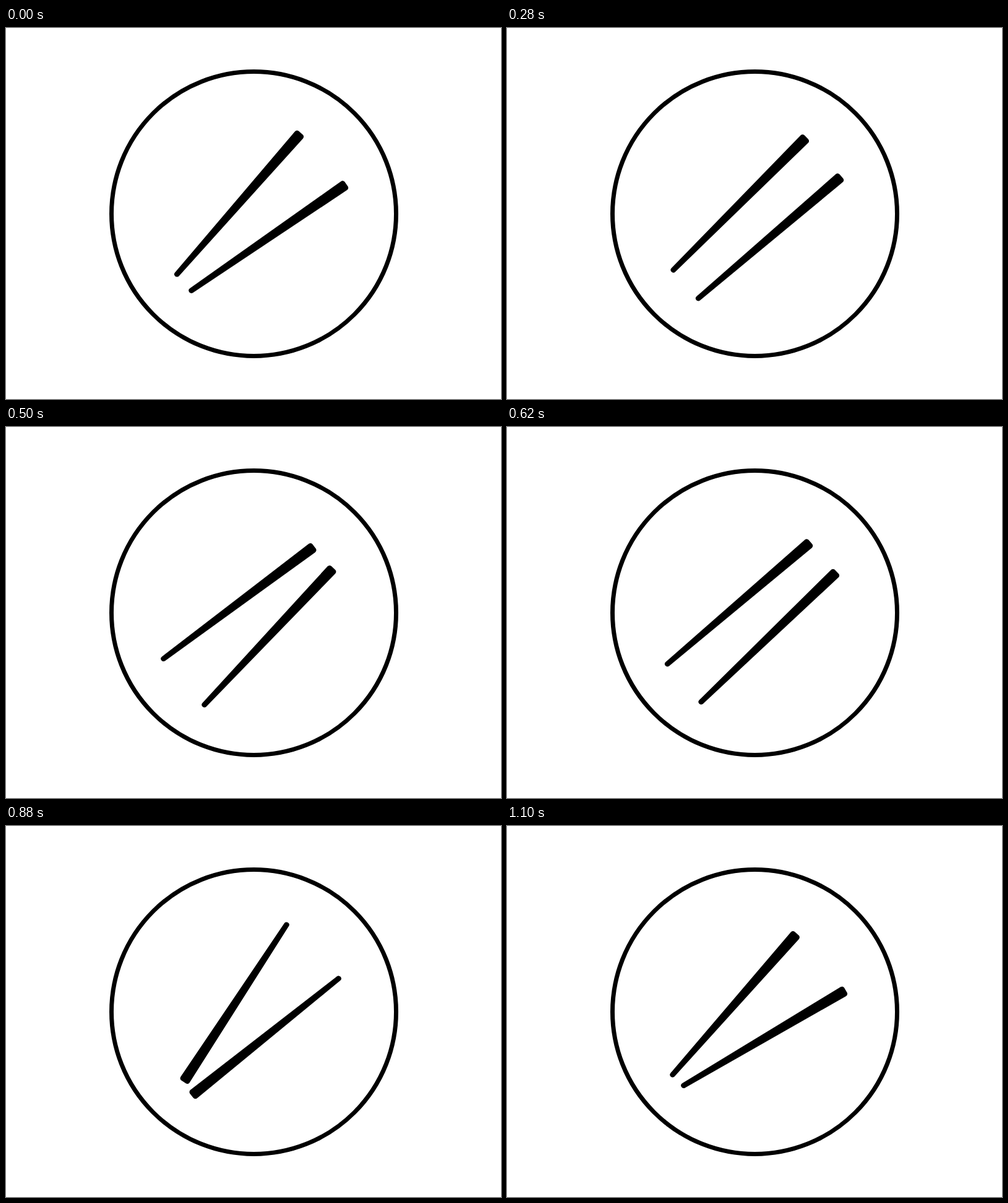
Recreate the animation shown at these times as an HTML page. Size 800 by 600 pixels, loop 1.12 s.

```html
<!DOCTYPE html>
<html>
<head>
<meta charset="utf-8">
<style>
html, body { margin: 0; width: 100%; height: 100%; overflow: hidden; background: #fff; }
svg { display: block; }
</style>
</head>
<body>
<svg width="800" height="600" viewBox="0 0 800 600" stroke="#000">
  <defs><path id="stick" d="M-152 0 147.5 -4.3V4.3Z" stroke-width="8.6" stroke-linejoin="round"/></defs>
  <circle cx="400.5" cy="300.5" r="230" fill="none" stroke-width="7"/>
  <use href="#stick" class="stick"/>
  <use href="#stick" class="stick"/>
</svg>
<script>
const LOOP = 1120, STEP = 20;
// Each stick turns about its own centre; keys are [ms, degrees].
const sticks = [
  { x: 376.4, y: 283.9, keys: [[0, 48.8], [180, 35], [360, 52], [540, 34.7], [720, 48.7]] },
  { x: 424.9, y: 338.5, keys: [[0, 34.5], [180, 48.5], [360, 34.8], [560, 49.8], [720, 30.5]] }
];
const nodes = document.querySelectorAll('.stick');

const progress = (t, from, to) => Math.min(1, Math.max(0, (t - from) / (to - from)));
const ease = u => (1 - Math.cos(Math.PI * u)) / 2;

function pinch(keys, t) {
  let angle = keys[0][1];
  for (let i = 1; i < keys.length; i++) {
    const [t0, a0] = keys[i - 1], [t1, a1] = keys[i];
    angle += (a1 - a0) * ease(progress(t, t0, t1));
  }
  return angle;
}

function draw(t) {
  const drift = progress(t, 540, 1000);
  const u = progress(t, 697, 1000);
  const spin = 360 * u * u * (1.78 - 0.78 * u);
  sticks.forEach((s, i) => {
    const x = s.x - 8.4 * drift, y = s.y + 4.1 * drift;
    nodes[i].setAttribute('transform', `translate(${x} ${y}) rotate(${spin - pinch(s.keys, t)})`);
  });
}

const start = performance.now();
function tick() {
  const t = (performance.now() - start) % LOOP;
  draw(Math.floor(t / STEP) * STEP);
  requestAnimationFrame(tick);
}
tick();
</script>
</body>
</html>
```
